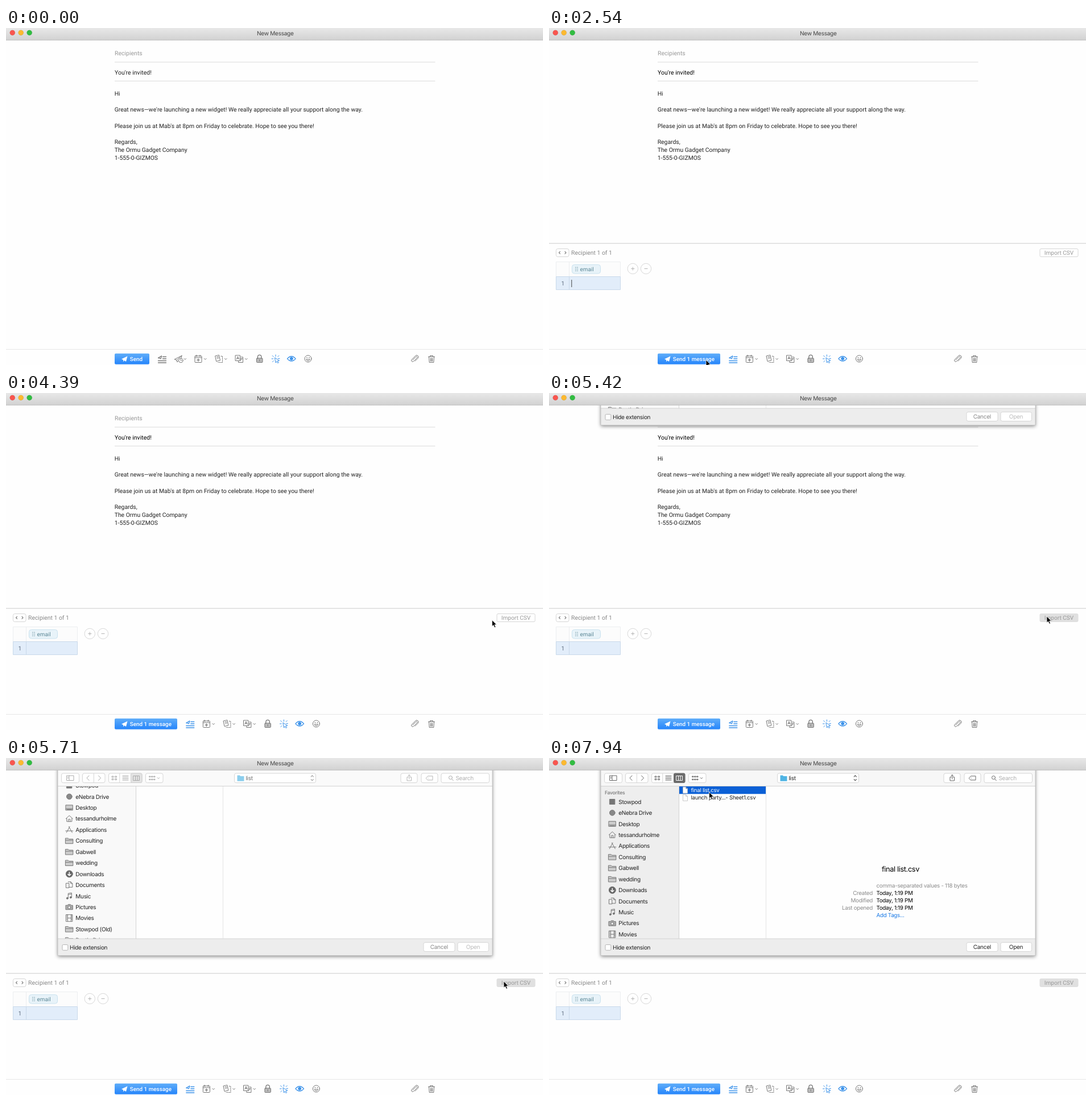
These frames come from a looping animation (944x593 px, 8000 ms). An HTML page:

```html
<!DOCTYPE html>
<html lang="en">
<head>
<meta charset="utf-8">
<title>New Message</title>
<style>
html, body { margin: 0; width: 100%; height: 100%; overflow: hidden; background: #fefefe; }
svg { display: block; width: 944px; height: 593px; }
text { font: 10.4px Roboto, sans-serif; fill: #222; text-rendering: geometricPrecision; }
.ui text { font: 10px Inter, sans-serif; letter-spacing: -.03em; }
.line { stroke: #dadada; fill: none; }
.icon { stroke: #777; fill: none; stroke-linejoin: round; stroke-linecap: round; }
.blue { stroke: #3d93ea; }
text.mid { text-anchor: middle; }
text.end { text-anchor: end; }
text.grey { fill: #999; }
text.label { fill: #8c8c8c; }
text.send { font-size: 9.9px; font-weight: 500; fill: #fff; }

.panel, .wide, .preview, .files { visibility: hidden; }
.merge :is(.panel, .wide), .active .files, .picked .preview { visibility: visible; }
.merge :is(.later, .narrow) { visibility: hidden; }
.merge .subject { fill: #000; }
.merge .shift { transform: translateX(14.4px); }
.merge .list { transform: translateX(49.3px); stroke: #3d93ea; }
.hover:not(.merge) .list { stroke: #333; }
.pressed .import { fill: #e0e0e0; stroke: #dedede; }

.box { fill: #fff; stroke: #d6d6d6; }
.pane { fill: #f9f9f9; }
.bar { fill: #fafafa; }
.active .pane { fill: #eee; }
.active .bar { fill: #f7f7f7; }
.tools .icon { stroke: #aaa; }
.active .tools .icon { stroke: #666; }
.tools .icon.dim { stroke: #b5b5b5; }
.picked .tools .icon.dim { stroke: #666; }
.seg { fill: #e3e3e3; stroke: #cfcfcf; }
.active .seg { fill: #6b6b6b; stroke: #6b6b6b; }
.active .tools .icon.cols { stroke: #fff; }
.folder, .where { opacity: .65; }
.active :is(.folder, .where) { opacity: 1; }
.cancel { fill: #888; }
.open { fill: #bbb; }
.active .cancel, .picked .open { fill: #222; }
.row { fill: none; }
.picked .row { fill: #0b60d6; }
.picked .first { fill: #fff; }
</style>
</head>
<body>
<svg id="stage" viewBox="0 0 944 593">
<defs>
  <linearGradient id="title" x2="0" y2="1"><stop stop-color="#e8e8e8"/><stop offset="1" stop-color="#d2d2d2"/></linearGradient>
  <linearGradient id="send" x2="0" y2="1"><stop stop-color="#5fadf9"/><stop offset="1" stop-color="#2585fb"/></linearGradient>
  <clipPath id="below"><path d="M0 21h944v572H0z"/></clipPath>
  <clipPath id="sideClip"><path d="M91 50h137v267.500H91z"/></clipPath>
  <path id="chev" d="M-1.800-.9L0 .9 1.800-.9"/>
  <path id="page" d="M235.500 51h5l3 3v8h-8zM240.500 51v3h3"/>
</defs>
<rect width="944" height="593" fill="#fefefe"/>

<!-- message -->
<text x="191" y="48" style="font-size:10.5px" class="grey">Recipients</text>
<text x="191" y="81.500" style="font-size:10.5px" class="subject">You're invited!</text>
<path class="line" d="M191 60h563.500M191 93.300h563.500"/>
<g id="body"></g>

<!-- recipient panel -->
<g class="panel">
  <path d="M0 379h944" stroke="#c9c9c9"/>
  <rect class="box" x="12.500" y="388.500" width="22.500" height="14" rx="3"/>
  <path d="M19.500 393.300l-2 2 2 2M28 393.300l2 2-2 2" class="icon" stroke-width="1.200"/>
  <text x="39" y="399" style="fill:#888">Recipient 1 of 1</text>
  <rect class="box import" x="863" y="388.500" width="67" height="14" rx="2"/>
  <text class="mid grey" x="896.500" y="398.500" style="font-size:10.1px">Import CSV</text>
  <path d="M12.500 411.500h113v26h-113z" fill="#fcfcfc" stroke="#eceef0"/>
  <path d="M35.500 411v26" stroke="#eceef0"/>
  <path d="M12.500 437.500h113v23h-113z" fill="#e2edfa" stroke="#c9d9ea"/>
  <path d="M35.500 438v22" stroke="#c9d9ea"/>
  <text class="mid" x="24.300" y="452.500" style="fill:#5f6f80">1</text>
  <rect x="40.500" y="416.500" width="50" height="15.500" rx="4" fill="#e8f3f9" stroke="#c9e2ef"/>
  <path d="M47 420.500v8M50 420.500v8" stroke="#7d9fab" stroke-width="1.300" stroke-dasharray="1.500 1.500"/>
  <text x="54.500" y="427.500" style="font-size:9.9px;fill:#5b8796">email</text>
  <g fill="#fff" stroke="#d8d8d8"><circle cx="147.300" cy="423.500" r="9.200"/><circle cx="170.500" cy="423.500" r="9.200"/></g>
  <path d="M144.300 423.500h6M147.300 420.500v6M167.500 423.500h6" stroke="#b5b5b5"/>
  <path id="caret" d="M39.800 443v13" stroke="#444"/>
</g>

<!-- bottom bar -->
<path d="M0 565.500h944" stroke="#e6e6e6"/>
<rect class="narrow" x="191" y="572.800" width="61" height="19" rx="2" fill="url(#send)"/>
<rect class="wide" x="191" y="572.800" width="110" height="19" rx="2" fill="url(#send)"/>
<path d="M203 582.500l10.500-5-2.500 9.500-3-2-1.500 2.500-.5-3.500z" fill="#fff"/>
<text class="narrow send" x="217.800" y="585.800">Send</text>
<text class="wide send" x="217.800" y="585.800">Send 1 message</text>
<g class="icon list" stroke-width="1.300"><path d="M275.500 578.500h6M275.500 582h6M267.500 585.500h14M267.500 589h14M267.500 580.500l6-3.500-1.500 5-1.700-1z"/></g>
<g class="icon later"><path d="M303 585.500l-2 2.500-.8-3.500-4-1.500 13-6.500-1.500 4.500M300 584.500l9-8"/><circle cx="307.300" cy="585" r="3.700"/><path d="M307.300 583v2h1.500"/><use href="#chev" x="314.800" y="582.500"/></g>
<g class="icon shift">
  <rect x="332" y="577" width="12" height="11.500" rx="1"/><path d="M332 580h12M335 575.500v2.500M341 575.500v2.500M338 582v4.400M335.800 584.200h4.400" stroke-width="1.200"/>
  <use href="#chev" x="350.300" y="582.500"/>
  <path d="M368 577l6.500-1.500 2 9.500-6.500 1.500zM370.500 579l3-.7M371 581.300l3-.7"/><path d="M378 577.500h2.500v11h-8" stroke-dasharray="1.500 1.500"/>
  <use href="#chev" x="386.300" y="582.500"/>
  <path d="M403.500 576h8v9.500h-8zM405.500 583l2-5 2 5M406.200 581.500h2.600M413 579h3.500v9.500h-8v-2M412.500 582h3M414 581.500q0 3-2.500 4.500"/>
  <use href="#chev" x="422.300" y="582.500"/>
  <rect x="440.500" y="581" width="10.500" height="7.500" rx="1" fill="#bbb"/><path d="M442.500 581v-2.500a3.200 3.200 0 0 1 6.400 0v2.500" stroke-width="1.300"/><path d="M445.700 583.500v2.500"/>
  <g class="blue"><path d="M472.500 580.500l1.500 8.500 1.800-2.300 2 3 1.500-1-2-2.900 2.800-.7zM474 575v3M468.300 576.500l2 2M467 582h2.800M468.500 587.500l1.800-1.800M479.800 576.500l-2 2M478.500 581.500h2.500"/>
  <path d="M494.500 582q7.300-8.500 14.600 0-7.300 8-14.600 0z" stroke-width="1.300"/><circle cx="501.800" cy="581.800" r="2.500" fill="#3d93ea"/></g>
  <circle cx="531" cy="582" r="6"/><path d="M527.800 583.500q3.200 5 6.400 0z"/><path d="M529 580v.4M533 580v.4" stroke-width="1.500"/>
</g>
<g class="icon"><path d="M715 584l5.500-5.500a1.300 1.300 0 0 1 2 2l-6 6a2.200 2.200 0 0 1-3.200-3.200l6.500-6.500a3 3 0 0 1 4.300 4.300l-5 5"/>
<path d="M742.500 578.500h11M745.500 578.500v-2h5v2M743.500 579l.7 9.500h7.600l.7-9.500M746.300 581v5.500M748 581v5.500M749.700 581v5.500"/></g>

<!-- file sheet -->
<g clip-path="url(#below)"><g id="sheet" class="ui">
  <rect x="91" y="-20" width="764" height="367.500" fill="#fefefe" style="filter:drop-shadow(0 2px 3px #0007)"/>
  <path class="bar" d="M91 21h764v28H91z"/>
  <path class="pane" d="M91 49h137.500v269H91z"/>
  <path d="M91 318h764v29.500H91z" fill="#ededed"/>
  <path d="M91 49.500h764M228.500 50v268M91 318h764" stroke="#d2d2d2"/>
  <path d="M381.500 50v268" stroke="#e4e4e4"/>
  <path d="M91 21v326.500h764V21" fill="none" stroke="#b8b8b8" stroke-width=".7"/>
  <g class="tools">
    <g id="boxes"></g>
    <rect class="seg" x="219.500" y="27" width="19.500" height="16.500" rx="2"/>
    <path d="M154.300 27v16.500M199.800 27v16.500" stroke="#d4d4d4"/>
    <g class="icon">
      <path d="M107 31h12v8.500h-12zM111 31v8.500M108.500 33.500h1M108.500 35.500h1"/>
      <path d="M146 31l-4 4.200 4 4.200M162.500 31l4 4.200-4 4.200"/>
      <path d="M186.500 32h2.500v2h-2.500zM192 32h2.500v2H192zM186.500 36.500h2.500v2h-2.500zM192 36.500h2.500v2H192z"/>
      <path d="M205 31.500h10M205 34h10M205 36.500h10M205 39h10"/>
      <path d="M252 32h2v1.500h-2zM256 32h2v1.500h-2zM260 32h2v1.500h-2zM252 37h2v1.500h-2zM256 37h2v1.500h-2zM260 37h2v1.500h-2z"/>
      <use href="#chev" x="268" y="35.500"/>
      <path d="M536.300 33l2-2.300 2 2.300M536.300 37.500l2 2.300 2-2.300" stroke-width="1.200"/>
      <circle cx="781.500" cy="34.500" r="3"/><path d="M783.800 37l2.500 2.700"/>
    </g>
    <path class="icon cols" d="M224 31.500h10.500v8H224zM227.500 31.500v8M231 31.500v8"/>
    <path class="icon dim" d="M707 33.500h-2v6.500h7.500v-6.500h-2M708.800 37v-7.500l-2 2M708.800 29.500l2 2M738.500 35.300l3-3.500h8.500v7h-8.500zM742 35.300h.3"/>
    <path class="folder" d="M406.500 30.500h4.500l1.300 1.500h6.200v8.700h-12z" fill="#4fb4e4"/>
    <text class="where" x="421.500" y="38.800">list</text>
    <text x="790.500" y="38.800" style="fill:#b0b0b0">Search</text>
  </g>
  <g clip-path="url(#sideClip)"><g id="side"><text x="98" y="64" style="font-size:8.600px;font-weight:500;fill:#777">Favorites</text></g></g>
  <g class="files">
    <path class="row" d="M229 50h152v13.300H229z"/>
    <g fill="#fff" stroke="#bbb" stroke-width=".8"><use href="#page"/><use href="#page" y="13.400"/></g>
    <text class="first" x="249.500" y="60" style="font-size:9.7px">final list.csv</text>
    <text x="249.500" y="73.200" style="font-size:9.7px">launch party...- Sheet1.csv</text>
  </g>
  <g class="preview" id="info"><text class="mid" x="618" y="199.500" style="font-size:12.800px;fill:#000">final list.csv</text></g>
  <rect class="box" x="99" y="328.500" width="9.800" height="9.800" rx="1.500" style="stroke:#b5b5b5"/>
  <text x="112" y="337">Hide extension</text>
  <rect class="box" x="734" y="324.500" width="55" height="16" rx="3"/>
  <rect class="box" x="794" y="324.500" width="54.500" height="16" rx="3"/>
  <text class="mid cancel" x="761.300" y="336.200">Cancel</text>
  <text class="mid open" x="821" y="336.200">Open</text>
</g></g>

<!-- title bar -->
<g class="ui">
  <path d="M0 0h944v21H0z" fill="url(#title)"/><path d="M0 21.300h944" stroke="#bdbdbd"/>
  <g stroke="#0002" stroke-width=".6"><circle cx="11.300" cy="8.300" r="4.600" fill="#f9564f"/><circle cx="26.200" cy="8.300" r="4.600" fill="#fcb92f"/><circle cx="41.200" cy="8.300" r="4.600" fill="#32bd42"/></g>
  <text class="mid" x="473.300" y="13" style="fill:#444;font-size:10.1px">New Message</text>
</g>
<path id="cursor" d="M0 0v11.300l2.600-2.400 1.900 4.400 2-.9-1.900-4.200h3.500z" fill="#000" stroke="#fff" stroke-width=".8"/>
</svg>

<script>
const $ = id => document.getElementById(id);
const add = (id, html) => $(id).insertAdjacentHTML('beforeend', html);

const letter = [
  'Hi', '',
  "Great news—we're launching a new widget! We really appreciate all your support along the way.", '',
  "Please join us at Mab's at 8pm on Friday to celebrate. Hope to see you there!", '',
  'Regards,', 'The Ormu Gadget Company', '1-555-0-GIZMOS'
];
letter.forEach((s, i) => add('body', `<text x="190.700" y="${118.800 + i * 14.200}">${s}</text>`));

for (const [x, w] of [[97.5, 31], [134.5, 39.5], [180.5, 58.5], [245.5, 30.5], [401.5, 143], [694, 29], [730, 29], [765, 84.500]])
  add('boxes', `<rect class="box" x="${x}" y="27" width="${w}" height="16.500" rx="3"/>`);

// sidebar icons, centred on 0,0
const folder = '<path d="M-6.500-4.500h4.500l1.500 1.500h7v8h-13zM-6.500-1h13" fill="#ccc"/>';
const places = [
  ['Stowpod', '<path d="M-4.500-4.500h9v9h-9z" fill="#777"/>'],
  ['eNebra Drive', '<circle r="4.800" fill="#888"/>'],
  ['Desktop', '<path d="M-6-4.500H6v9H-6zM-6 2H6M-4 3.300H4" fill="#ccc"/>'],
  ['tessandurholme', '<path d="M-6 0L0-5.500 6 0M-4.500-.5v5.500h9v-5.500M-1.500 5v-4h3v4"/>'],
  ['Applications', '<path d="M-5 5L.8-5.500M5 5L-.8-5.500M-6.500 2h13"/>'],
  ['Consulting', folder],
  ['Gabwell', folder],
  ['wedding', folder],
  ['Downloads', '<circle r="6" fill="#666"/><path d="M0-3v6M-2.500.7L0 3 2.500.7" stroke="#fff" stroke-width="1.500"/>'],
  ['Documents', '<path d="M-5.500-3h5v8h-5zM-2-5.500h4.500l3 3v6.500h-6M2.500-5.500v3h3"/>'],
  ['Music', '<path d="M-2 3.500v-8l6-1v7.500M-2-2.500l6-1"/><g fill="#777"><circle cx="-3.500" cy="4" r="1.500"/><circle cx="2.500" cy="2.500" r="1.500"/></g>'],
  ['Pictures', '<path d="M-6-3h3l1-1.500h4l1 1.500h3v7.500H-6z" fill="#aaa"/><circle cy=".7" r="2.400" fill="#eee"/>'],
  ['Movies', '<path d="M-5.500-6h11v12h-11zM-3-6v12M3-6v12M-3 0h6"/><path d="M-4.200-5v10M4.200-5v10" stroke-dasharray=".5 2"/>'],
  ['Stowpod (Old)', folder],
  ['Pantle Drive', folder]
];
places.forEach(([name, icon], i) => add('side', `<g transform="translate(111.300 ${77 + i * 19.430})">
  <g class="icon">${icon}</g><text x="11" y="3.700">${name}</text></g>`));

const when = 'Today, 1:19 PM';
[['', 'comma-separated values - 118 bytes', '#8c8c8c'], ['Created', when, '#000'], ['Modified', when, '#000'],
 ['Last opened', when, '#000'], ['', 'Add Tags...', '#1a7ae6']].forEach(([label, value, color], i) => {
  const y = 228.300 + i * 12.850;
  add('info', `<text class="end label" x="569" y="${y}" style="font-size:9.800px">${label}</text>
    <text x="575.500" y="${y}" style="font-size:9.800px;fill:${color}">${value}</text>`);
});

// how many of n evenly spaced steps have happened
const step = (t, from, to, n) =>
  Math.max(0, Math.min(n, Math.floor((t - from) / (to - from) * (n - 1) + .07) + 1));
const easeInOut = (u, p) => u < .5 ? (2 * u) ** p / 2 : 1 - (2 - 2 * u) ** p / 2;

function pointer(t) {
  if (t < 600) return [960, 600];
  if (t < 1380) {
    const n = step(t, 600, 930, 3);
    return [1125 - 201 * n, 465 + 43 * n];
  }
  if (t < 3500) {
    const left = ((4 - step(t, 1380, 1820, 4)) / 3) ** 2;
    return [276 + 33 * left, 584 + 5 * left];
  }
  if (t < 6310) {
    const e = easeInOut(step(t, 3500, 4680, 9) / 9, 3.3);
    return [276 + 599 * e, 584 - 191 * e];
  }
  const left = 1 - step(t, 6310, 7350, 8) / 8;
  return [281.5 + 593.5 * left ** 3.9, 60 + 333 * left ** 2.17];
}

function draw(t) {
  const flags = { hover: 1670, merge: 2540, pressed: 4970, active: 5860, picked: 7940 };
  for (const name in flags) $('stage').classList.toggle(name, t >= flags[name]);

  $('cursor').setAttribute('transform', `translate(${pointer(t)})`);
  $('caret').style.opacity = t < 4970 && (t - 2540) % 990 < 450 ? 1 : 0;

  const n = step(t, 5420, 5710, 3);
  const lift = n ? 291 * ((3 - n) / 2) ** 1.5 : 400;
  $('sheet').setAttribute('transform', `translate(0 ${-lift})`);
  $('side').setAttribute('transform', `translate(0 ${t < 5860 ? -28.5 : 0})`);
}

function frame() {
  draw(performance.now() % 8000);
  requestAnimationFrame(frame);
}
frame();
</script>
</body>
</html>
```
